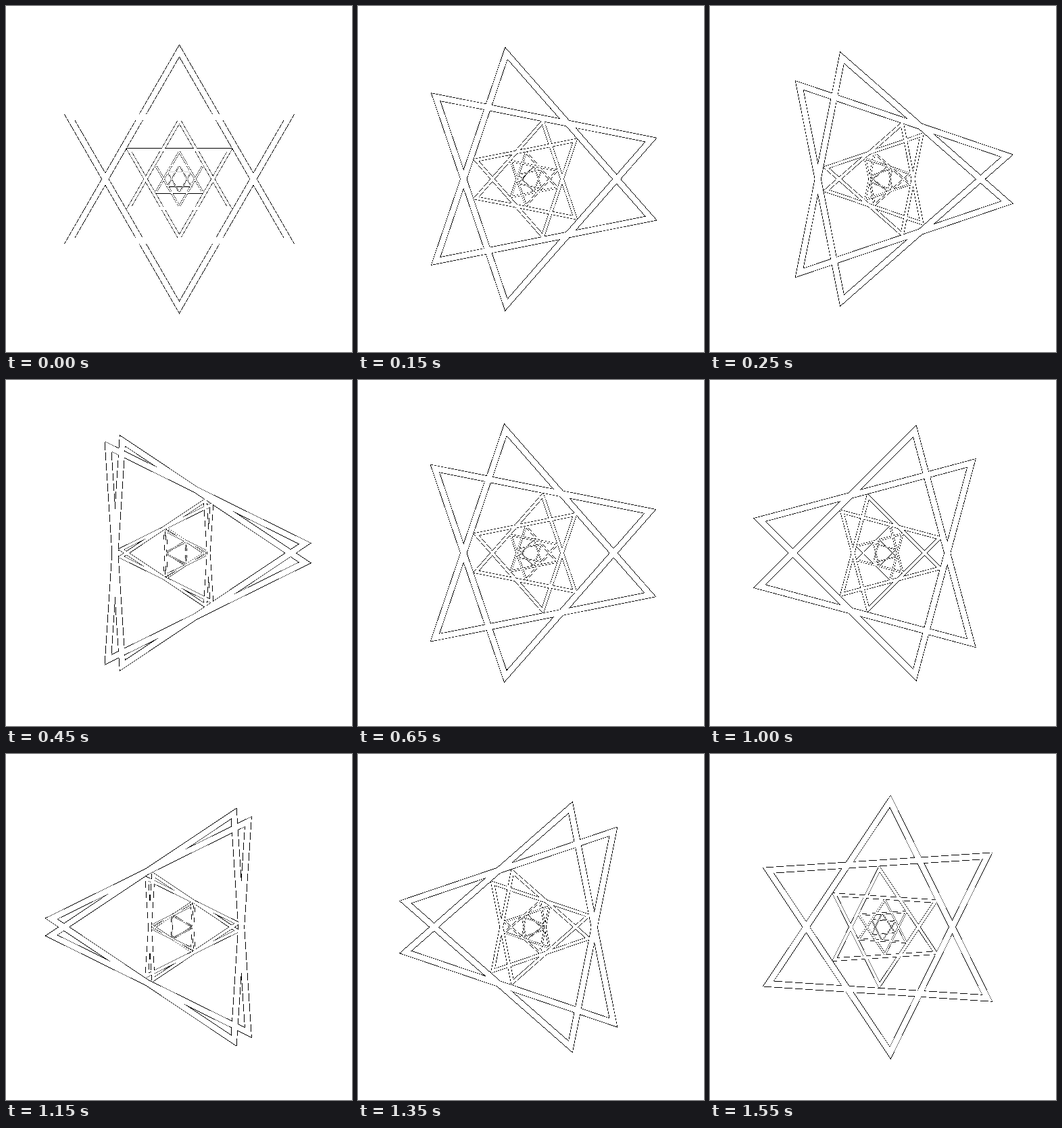
These frames come from a looping animation (512 px wide and 512 px high, 1.6 s). An HTML page:

```html
<!DOCTYPE html>
<html lang="en">
<head>
<meta charset="utf-8">
<title>Counter-rotating triangles</title>
<style>
  html, body { margin: 0; width: 100%; height: 100%; overflow: hidden; background: #fff; }
  svg { display: block; width: 100vw; height: 100vh; }
  path { fill: none; stroke-linejoin: miter; }
</style>
</head>
<body>
<svg viewBox="0 0 512 512" shape-rendering="crispEdges"></svg>
<script>
const LOOP = 1600, STEP = 50, TURN = 120;
const CX = 256.5, CY = 256.1;
const LINE = 0.75, THINNING = 0.8;

// Outer tip y, outer base y and band width of each nested triangle
const levels = [
  [-198.8, 96, 9],
  [91, -45.75, 4.7],
  [-42.8, 21.3, 2.35],
  [21.2, -11.3, 1.2]
];

const svg = document.querySelector('svg');

function add(parent, name, attrs) {
  const el = document.createElementNS('http://www.w3.org/2000/svg', name);
  for (const key in attrs) el.setAttribute(key, attrs[key]);
  return parent.appendChild(el);
}

// Path along the middle of a triangular band
function trianglePath(tip, base, width) {
  const dir = Math.sign(base - tip);
  const top = tip + dir * width;
  const bottom = base - dir * width / 2;
  const half = Math.abs(bottom - top) / Math.sqrt(3);
  return `M0 ${top}L${half} ${bottom}L${-half} ${bottom}Z`;
}

// Wide black bands under narrower white ones leave only the outline of their union
const spinners = [];
for (const [color, sign] of [['#000', 1], ['#fff', -1]]) {
  for (const flip of [1, -1]) {
    const side = add(svg, 'g', { transform: `translate(${CX} ${CY}) scale(1 ${flip})` });
    const spinner = add(side, 'g', { stroke: color });
    levels.forEach(([tip, base, width], depth) => {
      add(spinner, 'path', {
        d: trianglePath(tip, base, width),
        'stroke-width': width + sign * LINE * THINNING ** depth
      });
    });
    spinners.push(spinner);
  }
}

let shown = -1;
function draw(now) {
  const step = Math.floor((now % LOOP) / STEP);
  if (step !== shown) {
    shown = step;
    const angle = -TURN * step * STEP / LOOP;
    for (const s of spinners) s.setAttribute('transform', `rotate(${angle})`);
  }
}

const start = performance.now();
function tick() {
  draw(performance.now() - start);
  requestAnimationFrame(tick);
}
tick();
</script>
</body>
</html>
```
